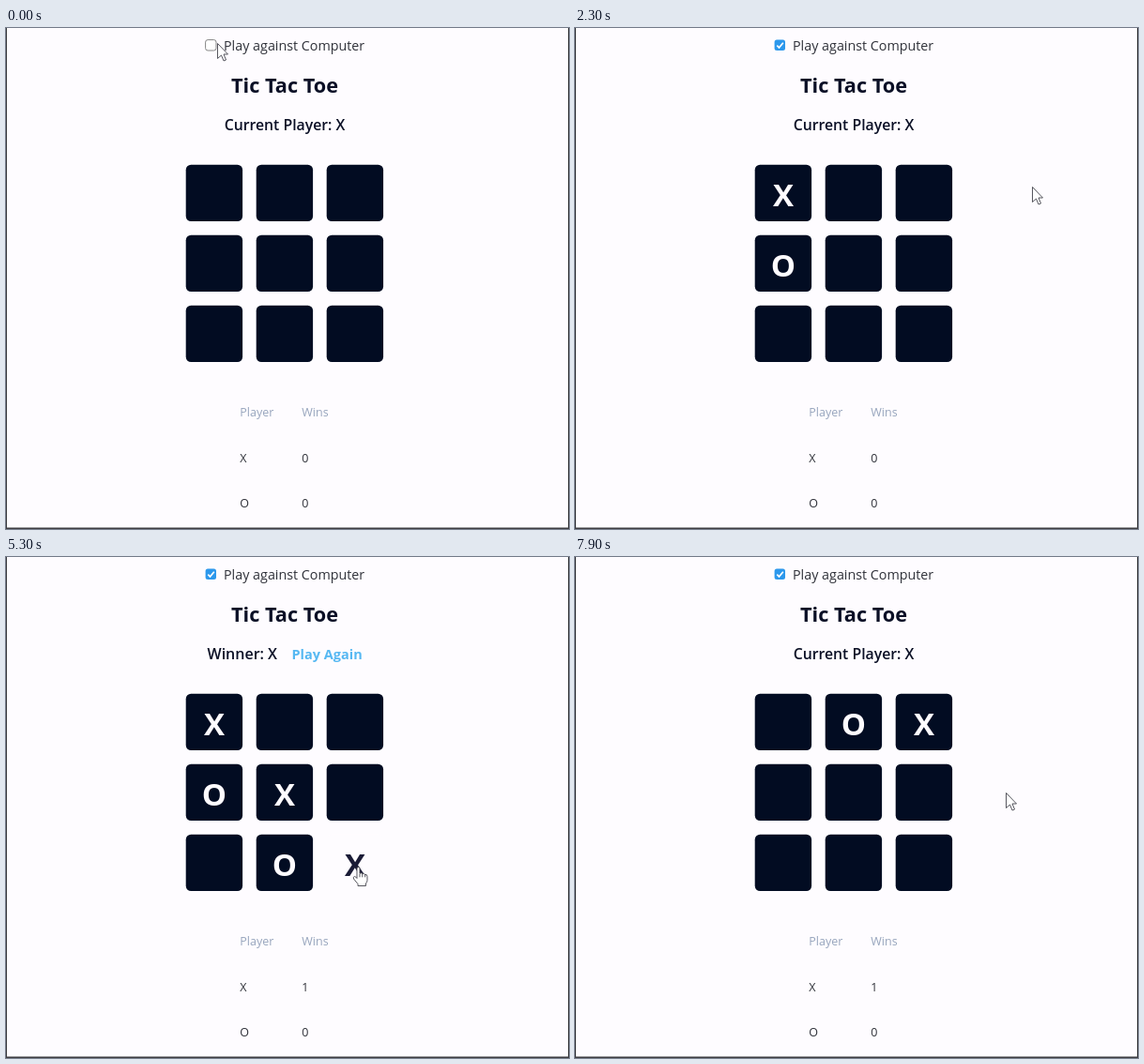
Animation of 600 by 534 pixels, one loop 8 s. Source, as an HTML page with a canvas:

```html
<!DOCTYPE html>
<html lang="en">
<head>
<meta charset="utf-8">
<title>Tic Tac Toe</title>
<style>
  html, body { margin: 0; width: 100%; height: 100%; overflow: hidden; background: #fefcff; }
  canvas { display: block; }
</style>
</head>
<body>
<canvas id="stage" width="600" height="534"></canvas>
<script>
const ctx = document.getElementById('stage').getContext('2d');
const LOOP = 8000, REPLY_DELAY = 500, HOVER_FADE = 110;
const FONT = '"Open Sans", "Noto Sans", sans-serif';
const PAPER = [254, 252, 255], INK = [2, 12, 34], HOVERED_MARK = [26, 27, 54];
const TITLE = '#0b1026', BODY = '#30323a', MUTED = '#97a5bd';
const LEFT = 192, TOP = 146, CELL = 60, PITCH = 75;

// Places where the pointer rests, and what it does there.
const stops = [
  { from: 0, to: 500, x: 225, y: 16, click: 300, action: 'check' },
  { from: 1300, to: 1720, x: 219, y: 170, click: 1630, action: 'mark', reply: 3 },
  { from: 2300, to: 2500, x: 487, y: 169 },
  { from: 2650, to: 3400, x: 297, y: 246, click: 2750, action: 'mark', reply: 7 },
  { from: 3450, to: 3600, x: 473, y: 217 },
  { from: 4100, to: 5500, x: 375, y: 330, click: 4250, action: 'mark' },
  { from: 6050, to: 6480, x: 349, y: 99, click: 6130, action: 'reset' },
  { from: 6900, to: 7400, x: 371, y: 170, click: 7200, action: 'mark', reply: 1 },
  { from: 7850, to: LOOP, x: 459, y: 251 }
];
const cellOf = s => Math.floor((s.y - TOP) / PITCH) * 3 + Math.floor((s.x - LEFT) / PITCH);
const moves = stops.filter(s => s.action === 'mark');
const clicks = stops.filter(s => s.click);
const CHECKED = clicks[0].click;
const WIN = moves.find(m => m.reply === undefined).click;
const RESET = stops.find(s => s.action === 'reset').click;

const arrowShape = new Path2D('M0 0V16L4 12.5L6.5 18.5L9 17.5L6.5 11.5H11Z');
const handShape = new Path2D(
  'M-1.5 12V1.5Q-1.5 0 0 0T1.5 1.5V7Q3 5.5 4.3 7.3Q6 6 7.2 8Q9.5 7.5 9.5 10' +
  'V14Q9.5 16 8 17.5V20H-.5V18L-5 12.5Q-6 10.5-4 10Q-2.8 10-1.5 12Z');

const clamp = v => Math.max(0, Math.min(1, v));
const mix = (a, b, k) => a + (b - a) * k;
const rgb = (from, to, k) => `rgb(${from.map((c, i) => Math.round(mix(c, to[i], k)))})`;

function text(str, x, y, size, weight, color, align = 'left') {
  ctx.font = `${weight} ${size}px ${FONT}`;
  ctx.textAlign = align;
  ctx.fillStyle = color;
  ctx.fillText(str, x, y);
}

function box(x, y, size, radius, color) {
  ctx.beginPath();
  ctx.roundRect(x, y, size, size, radius);
  ctx.fillStyle = color;
  ctx.fill();
}

// Eased travel between stops, swinging out to the right of the heading.
function pointerAt(t) {
  const next = stops.findIndex(s => t < s.to);
  const b = stops[next], a = stops[next - 1];
  if (t >= b.from) return [b.x, b.y];
  const u = (t - a.to) / (b.from - a.to), k = u * u * (3 - 2 * u);
  const swing = 0.37 * Math.sin(Math.PI * k);
  return [
    mix(a.x, b.x, k) - (b.y - a.y) * swing,
    mix(a.y, b.y, k) + (b.x - a.x) * swing
  ];
}

function hoverLevel(cell, t) {
  const s = moves.find(m => cellOf(m) === cell);
  return s ? clamp((t - s.from) / HOVER_FADE + 1) - clamp((t - s.to) / HOVER_FADE) : 0;
}

function markIn(cell, t) {
  const round = moves.filter(m => (m.click < RESET) === (t < RESET));
  if (round.some(m => cellOf(m) === cell && t >= m.click)) return 'X';
  if (round.some(m => m.reply === cell && t >= m.click + REPLY_DELAY)) return 'O';
  return '';
}

function drawCheckbox(checked) {
  box(212.6, 12.6, 11.4, 2.5, checked ? '#2c98ec' : '#fff');
  ctx.lineWidth = checked ? 1.7 : 1;
  ctx.strokeStyle = checked ? '#fff' : '#858585';
  if (checked) {
    ctx.beginPath();
    ctx.moveTo(215.3, 18.7);
    ctx.lineTo(217.5, 21);
    ctx.lineTo(221.8, 15.8);
  }
  ctx.stroke();
}

function drawStatus(t) {
  if (t >= WIN && t < RESET) {
    text('Winner: X', 214.5, 109, 16, 600, TITLE);
    text('Play Again', 304.5, 109, 14.5, 700, '#56b8f2');
    return;
  }
  const waiting = moves.some(m => t >= m.click && t < m.click + REPLY_DELAY);
  text('Current Player: ' + (waiting ? 'O' : 'X'), 297, 109, 15.8, 600, TITLE, 'center');
}

function drawBoard(t) {
  for (let i = 0; i < 9; i++) {
    const x = LEFT + i % 3 * PITCH, y = TOP + Math.floor(i / 3) * PITCH;
    const level = hoverLevel(i, t);
    box(x - 0.3, y - 0.3, CELL + 0.4, 5.5, rgb(INK, PAPER, level));
    text(markIn(i, t), x + 30, y + 43.5, 33, 700, rgb(PAPER, HOVERED_MARK, level), 'center');
  }
}

function drawScores(t) {
  const rows = [['Player', 'Wins'], ['X', t >= WIN ? '1' : '0'], ['O', '0']];
  rows.forEach(([player, wins], i) => {
    const y = 414 + i * 48.5, color = i ? BODY : MUTED;
    text(player, 249.3, y, 12.5, 400, color);
    text(wins, 315.3, y, 12.5, 400, color);
  });
}

function drawPointer(t) {
  const [x, y] = pointerAt(t);
  for (const { click } of clicks) {
    const age = t - click;
    if (age < -100 || age > 600) continue;
    ctx.fillStyle = `rgba(240, 60, 240, ${0.6 * (1 - clamp((age - 280) / 320))})`;
    ctx.beginPath();
    ctx.arc(x, y + 1, 18.5, 0, Math.PI * 2);
    ctx.fill();
  }
  const hand = stops.some(s => /mark|reset/.test(s.action) &&
    t >= s.from - HOVER_FADE && t < s.to + HOVER_FADE);
  const shape = hand ? handShape : arrowShape;
  ctx.save();
  ctx.translate(x + 0.5, y + 0.5);
  ctx.lineWidth = 0.9;
  ctx.fillStyle = '#fff';
  ctx.strokeStyle = '#45454d';
  ctx.fill(shape);
  ctx.stroke(shape);
  if (hand) {
    ctx.beginPath();
    for (const finger of [1.5, 4.3, 7.2]) {
      ctx.moveTo(finger, 7.5);
      ctx.lineTo(finger, 10.8);
    }
    ctx.stroke();
  }
  ctx.restore();
}

function drawFrame(t) {
  ctx.fillStyle = rgb(PAPER, PAPER, 0);
  ctx.fillRect(0, 0, 600, 534);
  drawCheckbox(t >= CHECKED);
  text('Play against Computer', 232, 24, 14.3, 400, BODY);
  text('Tic Tac Toe', 297, 69, 21.7, 700, TITLE, 'center');
  drawStatus(t);
  drawBoard(t);
  drawScores(t);
  ctx.fillStyle = '#3c3c40';
  ctx.fillRect(0, 0, 1, 534);
  ctx.fillRect(599, 0, 1, 534);
  ctx.fillRect(0, 532.5, 600, 1.5);
  drawPointer(t);
}

const start = performance.now();
function tick() {
  drawFrame((performance.now() - start) % LOOP);
  requestAnimationFrame(tick);
}
tick();
</script>
</body>
</html>
```
